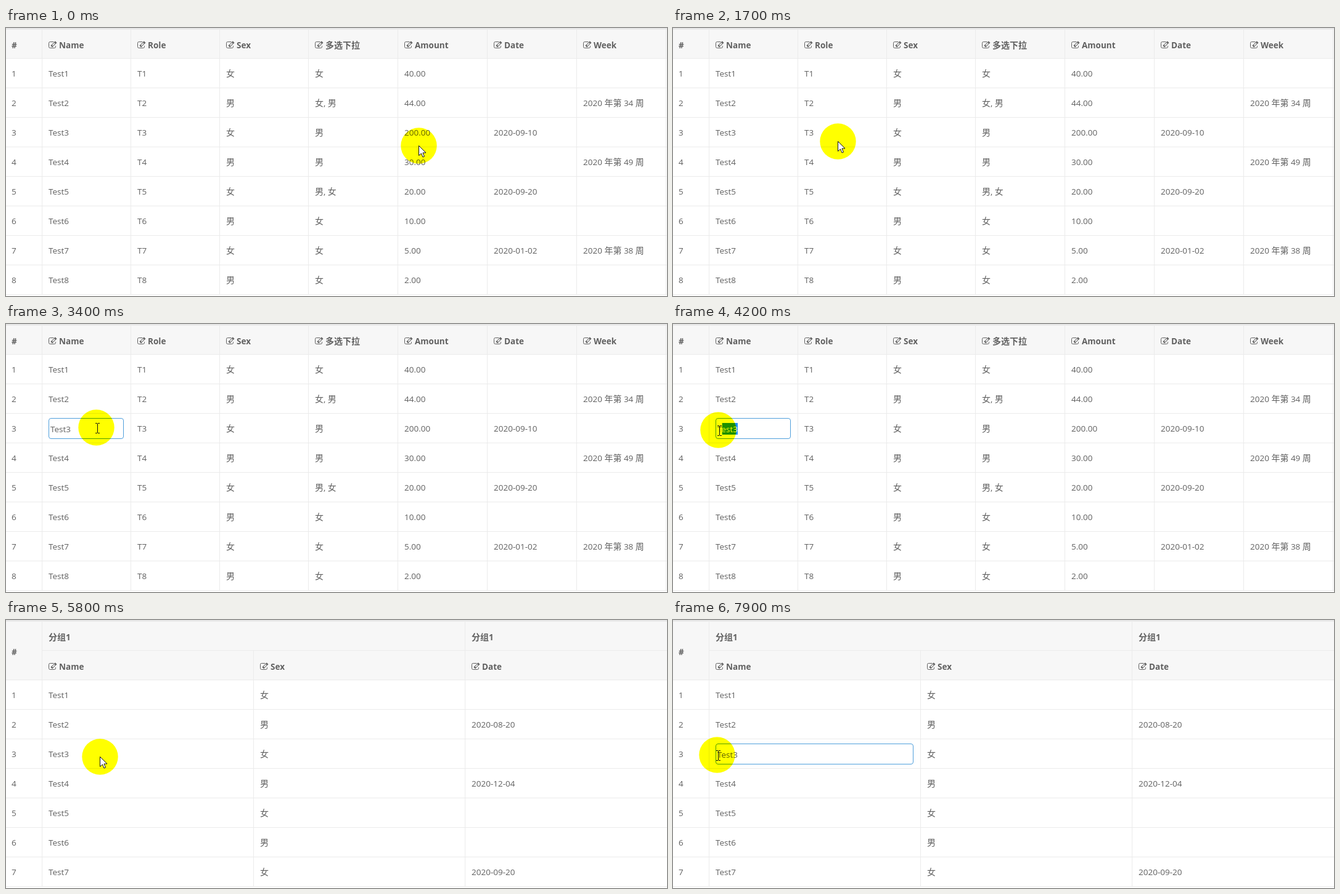
These frames come from a looping animation (1072x436 px, 8 s). An HTML page with a canvas:

```html
<!DOCTYPE html>
<html lang="zh">
<head>
<meta charset="utf-8">
<title>Editable table</title>
<style>
html, body { margin: 0; width: 100%; height: 100%; overflow: hidden; background: #fff; }
canvas { display: block; }
</style>
</head>
<body>
<canvas id="stage" width="1072" height="436"></canvas>
<script>
const W = 1072, H = 436, ROW = 48, FIRST = 58, PAD = 11;
const LOOP = 8000, STEP = 100, SWITCH = 5400;
const INK = '#606060', LINE = '#ebebeb', HEAD = '#f7f7f7', SELECT = '#1e90ff';
const WORD = 'Test3';
const ctx = document.getElementById('stage').getContext('2d');

const sex = i => i % 2 ? '男' : '女';
const range = (n, make) => Array.from({ length: n }, (_, i) => make(i));

const choices = '女|女, 男|男|男|男, 女|女|女|女'.split('|');
const amounts = [40, 44, 200, 30, 20, 10, 5, 2];
const dates = { 2: '2020-09-10', 4: '2020-09-20', 6: '2020-01-02' };
const weeks = { 1: 34, 3: 49, 6: 38 };
const groupDates = { 1: '2020-08-20', 3: '2020-12-04', 6: '2020-09-20' };

const full = {
  heads: ['Name', 'Role', 'Sex', '多选下拉', 'Amount', 'Date', 'Week'],
  colX: i => FIRST + 144 * i + Math.max(0, i - 3),
  headH: 49,
  inputW: 122,
  rows: range(8, i => [
    `Test${i + 1}`, `T${i + 1}`, sex(i), choices[i], amounts[i].toFixed(2),
    dates[i] || '', weeks[i] ? `2020 年第 ${weeks[i]} 周` : ''
  ])
};

const grouped = {
  heads: ['Name', 'Sex', 'Date'],
  colX: i => FIRST + 343 * i,
  headH: 97,
  inputW: 321,
  rows: range(7, i => [`Test${i + 1}`, sex(i), groupDates[i] || ''])
};

// Pointer turns: time, x, y
const path = [
  [700, 669, 191], [1000, 663, 201], [1300, 663, 201], [1700, 267, 184],
  [2200, 118, 156], [2600, 125, 125], [3100, 127, 128], [3400, 146, 168],
  [4100, 56, 173], [4200, 73, 172], [4800, 141, 173], [5200, 158, 171],
  [5800, 152, 222], [6700, 156, 223], [7200, 179, 222], [7900, 71, 219]
];

function pointerAt(t) {
  const i = Math.max(1, path.findIndex(p => p[0] >= t));
  const [t0, x0, y0] = path[i - 1], [t1, x1, y1] = path[i];
  const k = Math.max(0, (t - t0) / (t1 - t0));
  return { x: Math.round(x0 + (x1 - x0) * k), y: Math.round(y0 + (y1 - y0) * k) };
}

function rect(x, y, w, h, color) {
  ctx.fillStyle = color;
  ctx.fillRect(x, y, w, h);
}

function setFont(chinese, bold) {
  const family = chinese ? '14px "Noto Sans CJK SC"' : '13.5px "Open Sans"';
  ctx.font = `${bold ? 'bold' : 'normal'} ${family}, sans-serif`;
}

// Draws Latin and Chinese runs one after another
function text(str, x, y, { bold = false, color = INK } = {}) {
  ctx.fillStyle = color;
  for (const run of str.match(/[\u4e00-\u9fff]+|[^\u4e00-\u9fff]+/g) || []) {
    setFont(run >= '\u4e00', bold);
    ctx.fillText(run, x, y);
    x += ctx.measureText(run).width;
  }
}

function wordWidth(n) {
  setFont(false, false);
  return ctx.measureText(WORD.slice(0, n)).width;
}

function editIcon(x, y) {
  ctx.save();
  ctx.translate(x, y);
  ctx.strokeStyle = INK;
  ctx.lineWidth = 1;
  ctx.beginPath();
  ctx.moveTo(8.5, 1.5);
  ctx.arcTo(0.5, 1.5, 0.5, 11.5, 2);
  ctx.arcTo(0.5, 11.5, 11.5, 11.5, 2);
  ctx.arcTo(11.5, 11.5, 11.5, 8, 2);
  ctx.lineTo(11.5, 8);
  ctx.stroke();
  ctx.translate(5.2, 8.6);
  ctx.rotate(-Math.PI / 4);
  ctx.strokeRect(0, -1.4, 7.4, 2.8);
  rect(7.8, -1.9, 2, 3.8, INK);
  rect(-0.5, -1.5, 2, 3, INK);
  ctx.restore();
}

function drawTable({ heads, colX, rows, headH }) {
  const two = headH > ROW + 1;
  rect(0, 0, W, H, '#fff');
  rect(0, 0, W, headH, HEAD);
  rect(0, 0, W, 2, '#e7e7e7');
  rect(0, 2, W, 1, '#efefef');
  for (let y = headH; y < H; y += ROW) rect(0, y, W, 1, LINE);
  for (let i = 0; colX(i) < W; i++) {
    const top = two && i === 1 ? 49 : 3;
    rect(colX(i), top, 1, 434 - top, LINE);
  }
  text('#', 9, headH / 2 + 8, { bold: true });
  if (two) {
    rect(FIRST, 49, W - FIRST, 1, LINE);
    for (const i of [0, 2]) text('分组1', colX(i) + PAD, 33, { bold: true });
  }
  heads.forEach((label, i) => {
    const x = colX(i) + PAD;
    editIcon(x, headH - 28);
    text(label, x + 17, headH - 16, { bold: true });
  });
  rows.forEach((row, r) => {
    const y = headH + r * ROW + 30;
    text(String(r + 1), 9, y);
    row.forEach((cell, c) => text(cell, colX(c) + PAD, y));
  });
}

// Text field over the third name, selected from the given character on
function drawInput({ x, y, w, h }, from) {
  const tx = x + 3, ty = y + 23;
  rect(x, y, w, h, '#fff');
  ctx.strokeStyle = '#4f9fdc';
  ctx.lineWidth = 1;
  ctx.beginPath();
  ctx.roundRect(x + 0.5, y + 0.5, w - 1, h - 1, 3.5);
  ctx.stroke();
  text(WORD, tx, ty);
  const left = wordWidth(from), width = wordWidth(WORD.length) - left;
  ctx.save();
  ctx.beginPath();
  ctx.rect(tx + left, y + 8, width, 19);
  ctx.clip();
  rect(tx + left, y + 8, width, 19, SELECT);
  text(WORD, tx, ty, { color: '#fff' });
  ctx.restore();
}

function drawArrow(x, y) {
  ctx.beginPath();
  for (const [dx, dy] of [[0, 0], [0, 16], [4, 12.5], [6.5, 18.5], [9, 17.5], [6.5, 11.5], [11.5, 11.5]])
    ctx.lineTo(x + dx + 0.5, y + dy + 0.5);
  ctx.closePath();
  ctx.fillStyle = '#fff';
  ctx.fill();
  ctx.strokeStyle = '#111';
  ctx.lineWidth = 1;
  ctx.stroke();
}

function drawBeam(x, y) {
  rect(x, y - 7, 1, 15, '#111');
  for (const end of [y - 8, y + 8]) {
    rect(x - 3, end, 3, 1, '#111');
    rect(x + 1, end, 3, 1, '#111');
  }
}

function drawPointer({ x, y }, beam) {
  ctx.globalCompositeOperation = 'multiply';
  ctx.fillStyle = '#ff0';
  ctx.beginPath();
  ctx.arc(x + 0.5, y + 0.5, 29.2, 0, Math.PI * 2);
  ctx.fill();
  ctx.globalCompositeOperation = 'source-over';
  if (beam) drawBeam(x + 2, y + 1);
  else drawArrow(x, y);
}

function draw(t) {
  const table = t < SWITCH ? full : grouped;
  const box = { x: FIRST + PAD, y: table.headH + 2 * ROW + 8, w: table.inputW, h: 34 };
  const p = pointerAt(t);
  const editing = t >= 2300 && t < SWITCH || t >= 5900;
  const dragging = t >= 3500 && t < 4700;
  const picked = t >= 6400 && t < 7300;
  const inside = Math.abs(p.x - box.x - box.w / 2) < box.w / 2
    && Math.abs(p.y - box.y - box.h / 2) < box.h / 2;

  drawTable(table);
  if (editing) {
    let from = picked ? 0 : WORD.length;
    while (dragging && from > 0 && wordWidth(from - 0.5) > p.x - box.x - 3) from--;
    drawInput(box, from);
  }
  drawPointer(p, editing && (inside || dragging));
}

const start = performance.now();
function tick() {
  const t = (performance.now() - start) % LOOP;
  draw(Math.floor(t / STEP) * STEP);
  requestAnimationFrame(tick);
}
tick();
</script>
</body>
</html>
```
